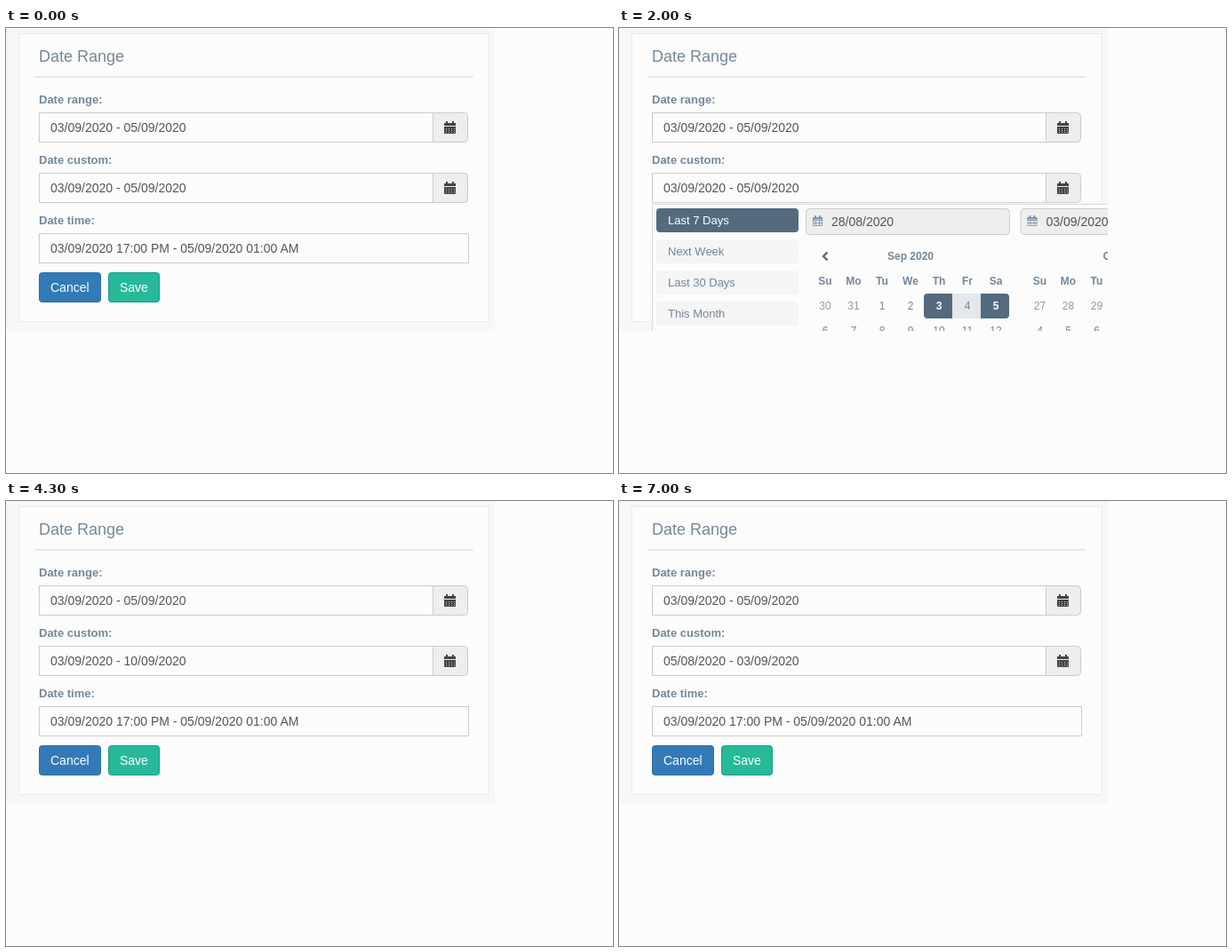
An HTML page that plays this animation: 683x501 px, repeating every 8 s.

```html
<!DOCTYPE html>
<html lang="en">
<head>
<meta charset="utf-8">
<title>Date range form</title>
<style>
  html, body { margin: 0; width: 100%; height: 100%; overflow: hidden; background: #fcfcfc; }
  svg { display: block; font-family: "Liberation Sans", Arial, sans-serif; }
  text { white-space: pre; }
  .label { font-size: 13px; font-weight: bold; fill: #73879c; }
  .value { font-size: 14px; fill: #555; }
  .button { font-size: 14px; fill: #fff; }
  .box { fill: #fcfcfc; stroke: #ccc; }
  .addon { fill: #eee; stroke: #ccc; }
  .range rect { fill: #f5f5f5; }
  .range text { font-size: 13px; fill: #73879c; }
  .range.lit rect { fill: #536a7f; }
  .range.lit text { fill: #fff; }
  .day { font-size: 12px; fill: #73879c; text-anchor: middle; }
  .bold { font-weight: bold; }
  .off { fill: #999; }
  .picked { fill: #fff; font-weight: bold; }
  #cancel.hover { fill: #286090; stroke: #204d74; }
</style>
</head>
<body>
<svg width="683" height="501" viewBox="0 0 683 501">
  <defs>
    <clipPath id="window"><rect width="550" height="341"/></clipPath>
    <g id="calendarIcon">
      <path fill="#444" d="M0 2h2V0h2v2h5V0h2v2h2v3H0zM0 6h13v7q0 1-1 1H1q-1 0-1-1z"/>
      <path stroke="#bbb" stroke-dasharray="1 2" d="M2 8.5h10M2 10.5h10M2 12.5h10"/>
    </g>
    <g id="smallIcon" fill="none" stroke="#73879c">
      <path d="M.5 2.5h10v9h-10zM.5 5.5h10M.5 8.5h10M3.5 5v6M7.5 5v6" stroke-opacity=".75"/>
      <path d="M0 3.5h11M3 0v3M8 0v3" stroke-width="2" stroke-opacity=".85"/>
    </g>
  </defs>
  <rect width="683" height="501" fill="#fcfcfc"/>
  <g clip-path="url(#window)">
    <rect width="550" height="341" fill="#f7f7f7"/>
    <rect x="14.5" y="6.5" width="529" height="324" fill="#fcfcfc" stroke="#e6e9ed"/>
    <text x="37" y="38" font-size="18" fill="#73879c">Date Range</text>
    <rect x="32" y="54" width="494" height="2" fill="#e6e9ed"/>

    <text class="label" x="37" y="85">Date range:</text>
    <text class="label" x="37" y="153">Date custom:</text>
    <text class="label" x="37" y="221">Date time:</text>
    <g id="fields"></g>
    <rect class="box" x="37.5" y="231.5" width="483" height="33"/>
    <text class="value" x="50" y="117">03/09/2020 - 05/09/2020</text>
    <text class="value" x="50" y="185" id="custom"></text>
    <text class="value" x="50" y="253">03/09/2020 17:00 PM - 05/09/2020 01:00 AM</text>
    <rect id="caret" y="172" width="1" height="16" fill="#000"/>
    <text id="counter" x="447" y="209" font-size="11" fill="#666">23 / 25</text>

    <rect id="cancel" x="37.5" y="275.5" width="69" height="33" rx="3" fill="#337ab7" stroke="#2e6da4"/>
    <rect x="115.5" y="275.5" width="57" height="33" rx="3" fill="#26b99a" stroke="#169f85"/>
    <text class="button" x="50" y="297">Cancel</text>
    <text class="button" x="128" y="297">Save</text>

    <g id="popup">
      <rect id="panel" x="37.5" y="198.5" height="200" fill="#fcfcfc" stroke="#d5d9e2"/>
      <g id="ranges"></g>
      <g id="calendars"></g>
    </g>
  </g>
</svg>
<script>
const $ = id => document.getElementById(id);
const label = (x, y, cls, str) => `<text x="${x}" y="${y}" class="${cls}">${str}</text>`;

$('fields').innerHTML = [95, 163].map(y => `
  <rect class="box" x="37.5" y="${y + .5}" width="443" height="33"/>
  <path class="addon" d="M480.5 ${y + .5}h35q4 0 4 4v25q0 4-4 4h-35z"/>
  <use href="#calendarIcon" x="493" y="${y + 10}"/>`).join('');

$('ranges').innerHTML = ['Last 7 Days', 'Next Week', 'Last 30 Days', 'This Month'].map((name, i) => `
  <g class="range"><rect x="42" y="${203 + 35 * i}" width="160" height="27" rx="4"/>
  ${label(55, 221 + 35 * i, '', name)}</g>`).join('');

// One month: the first two week rows, starting at the given dates.
function month(left, title, weeks, isOff, isPicked) {
  const column = i => left + 22 + 32 * i;
  const days = weeks.map((week, row) => week.map((day, i) => {
    const cls = isPicked(day, row) ? 'picked' : isOff(day) ? 'off' : '';
    return label(column(i), 317 + 28 * row, 'day ' + cls, day);
  }).join('')).join('');
  const heads = ['Su', 'Mo', 'Tu', 'We', 'Th', 'Fr', 'Sa']
    .map((name, i) => label(column(i), 289, 'day bold', name)).join('');
  return `<rect class="addon" x="${left + .5}" y="203.5" width="229" height="29" rx="4"/>
    <use href="#smallIcon" x="${left + 8}" y="211"/>
    <text class="value edge" x="${left + 29}" y="223"></text>
    ${label(left + 118, 261, 'day bold', title)}${heads}${days}`;
}

const run = (start, length = 7) => Array.from({ length }, (_, i) => start + i);
$('calendars').innerHTML = `
  <path d="M347 299h28v28h-28q-4 0-4-4v-20q0-4 4-4zM407 299h28q4 0 4 4v20q0 4-4 4h-28z" fill="#536a7f"/>
  <rect x="375" y="299" width="32" height="28" fill="#e4e7eb"/>
  <path d="M234.500 252.500l-4.500 4.500l4.500 4.500" fill="none" stroke="#536a7f" stroke-width="2.400"/>`
  + month(210, 'Sep 2020', [[30, 31, ...run(1, 5)], run(6)], d => d > 29, d => d === 3 || d === 5)
  + month(451.5, 'Oct 2020', [[...run(27, 4), ...run(1, 3)], run(4)], d => d > 26, () => false);

const initial = ['03/09/2020', '05/09/2020'];
const lastWeek = ['28/08/2020', '03/09/2020'];
const nextWeek = ['03/09/2020', '10/09/2020'];
const lastMonth = ['05/08/2020', '03/09/2020'];

// Each step changes only the listed parts of the state.
const closed = { open: false, lit: [], caret: 0 };
const steps = [
  [0, { ...closed, value: initial, edges: initial, wide: true, counter: false, hover: false }],
  [500, { open: true, caret: 69, counter: true }],
  [1000, { caret: 0 }],
  [1200, { lit: [0], edges: lastWeek }],
  [1300, { lit: [1], edges: nextWeek }],
  [1500, { caret: 69 }],
  [1900, { lit: [0], edges: lastWeek }],
  [2000, { caret: 0 }],
  [2400, { ...closed, value: lastWeek }],
  [2500, { counter: false }],
  [3400, { open: true, wide: false, lit: [0], caret: 124, counter: true }],
  [3700, { lit: [0, 1] }],
  [3900, { caret: 0 }],
  [4200, { ...closed, value: nextWeek }],
  [4300, { counter: false }],
  [5700, { open: true, lit: [1], caret: 129, counter: true }],
  [6000, { lit: [0, 1] }],
  [6100, { lit: [1] }],
  [6200, { lit: [1, 2], caret: 0 }],
  [6700, { ...closed, value: lastMonth, hover: true }],
  [6800, { counter: false }],
  [7000, { hover: false }]
];

const show = (id, on) => $(id).style.display = on ? '' : 'none';
const ranges = document.querySelectorAll('.range');
const edges = document.querySelectorAll('.edge');

function draw(time) {
  const state = Object.assign({}, ...steps.filter(([at]) => at <= time).map(([, part]) => part));
  $('custom').textContent = state.value.join(' - ');
  edges.forEach((edge, i) => edge.textContent = state.edges[i]);
  ranges.forEach((range, i) => range.classList.toggle('lit', state.lit.includes(i)));
  $('cancel').classList.toggle('hover', state.hover);
  $('caret').setAttribute('x', state.caret);
  $('panel').setAttribute('width', state.wide ? 700 : 169);
  show('caret', state.caret);
  show('counter', state.counter);
  show('popup', state.open);
  show('calendars', state.wide);
}

function tick() {
  draw(performance.now() % 8000);
  requestAnimationFrame(tick);
}
tick();
</script>
</body>
</html>
```
